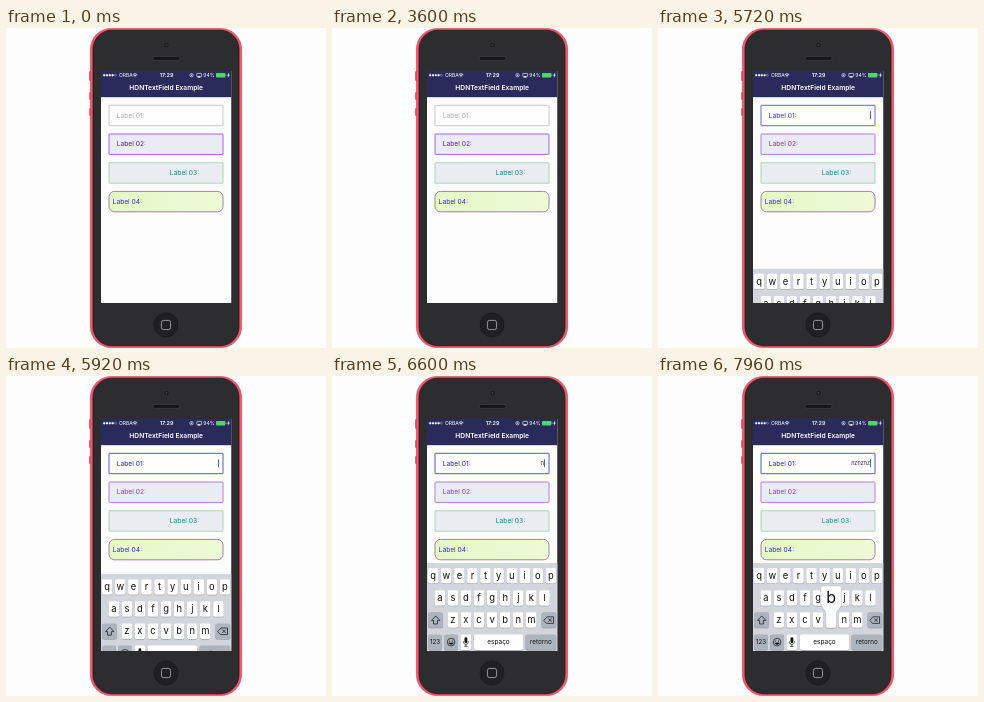
Recreate the animation shown at these times as an HTML page. Size 320 by 320 pixels, loop 8000 ms.

```html
<!DOCTYPE html>
<html lang="pt">
<head>
<meta charset="utf-8">
<title>HDNTextField Example</title>
<style>
html, body { margin: 0; width: 100%; height: 100%; overflow: hidden; background: #fdfdfd; }
svg { display: block; width: 100vw; height: 100vh; }
text { font-family: Inter, Roboto, sans-serif; }
</style>
</head>
<body>
<svg id="stage" viewBox="0 0 320 320"></svg>
<script>
const NS = "http://www.w3.org/2000/svg";
const stage = document.getElementById("stage");
const LOOP = 8000;

function add(parent, tag, attrs, content) {
  const el = document.createElementNS(NS, tag);
  for (const k in attrs) el.setAttribute(k, attrs[k]);
  if (content) el.textContent = content;
  parent.appendChild(el);
  return el;
}
const rect = (p, x, y, width, height, fill, rx = 0, more = {}) =>
  add(p, "rect", { x, y, width, height, fill, rx, ...more });
const dot = (p, cx, cy, r, fill, more = {}) => add(p, "circle", { cx, cy, r, fill, ...more });
const line = (p, d, stroke, width = 0.7, fill = "none") =>
  add(p, "path", { d, stroke, "stroke-width": width, fill, "stroke-linejoin": "round", "stroke-linecap": "round" });
const label = (p, x, y, size, fill, str, anchor = "start", weight = 400) =>
  add(p, "text", { x, y, "font-size": size, fill, "text-anchor": anchor, "font-weight": weight }, str);

const defs = add(stage, "defs", {});
const clip = add(defs, "clipPath", { id: "screen" });
rect(clip, 95, 43, 130.5, 232, "#000");
const grad = add(defs, "linearGradient", { id: "lime" });
add(grad, "stop", { offset: 0, "stop-color": "#e6f8c6" });
add(grad, "stop", { offset: 1, "stop-color": "#edfad6" });

// phone body
for (const [y, h] of [[43, 10], [64, 8], [80, 8]]) rect(stage, 83.2, y, 3, h, "#d9405a", 1);
rect(stage, 84.4, 0.4, 151.2, 319.2, "#f4566e", 21, { stroke: "#d8465e", "stroke-width": 0.7 });
rect(stage, 87, 2.2, 146, 315.6, "#2d2d2f", 19, { stroke: "#1c1c1e", "stroke-width": 0.8 });
dot(stage, 160.5, 17, 2.1, "#17171b");
dot(stage, 160.5, 17, 0.9, "#3b4258");
rect(stage, 147, 28.4, 27, 4, "#151517", 2, { stroke: "#48484b", "stroke-width": 0.6 });
dot(stage, 160, 297, 12, "#202022", { stroke: "#19191b", "stroke-width": 0.7 });
rect(stage, 155.4, 292.4, 9.2, 9.2, "none", 2.2, { stroke: "#a5a5a8", "stroke-width": 0.9 });

const screen = add(stage, "g", { "clip-path": "url(#screen)" });
rect(screen, 95, 43, 130.5, 232, "#fdfdfd");

// status and title bars
rect(screen, 95, 43, 130.5, 26.2, "#2a2b5b");
for (let i = 0; i < 5; i++)
  dot(screen, 98.2 + i * 2.8, 47.2, 1, i < 4 ? "#fff" : "none", { stroke: "#fff", "stroke-width": 0.3 });
label(screen, 113, 49.2, 5, "#fff", "ORBA");
line(screen, "M127 46.4Q129 44.6 131 46.4M127.9 47.5Q129 46.6 130.1 47.5M129 48.8v.1", "#fff", 0.8);
label(screen, 160.5, 49.3, 5.4, "#fff", "17:29", "middle", 600);
dot(screen, 185.5, 47.2, 1.7, "none", { stroke: "#fff", "stroke-width": 0.6 });
dot(screen, 185.5, 47.2, 0.6, "#fff");
rect(screen, 190.8, 45.4, 4.8, 3.2, "none", 0.4, { stroke: "#fff", "stroke-width": 0.6 });
line(screen, "M192 49.4h2.4l-1.2-1.3z", "#fff", 0.3, "#fff");
label(screen, 208.6, 49.2, 5, "#fff", "94%", "end");
rect(screen, 210, 45, 9.4, 4.4, "#4cd964", 0.8);
rect(screen, 219.7, 46.4, 0.7, 1.6, "#4cd964");
line(screen, "M222.8 45L221.4 47.4H222.6L222 49.6L223.6 46.8H222.4Z", "#fff", 0.2, "#fff");
label(screen, 160.2, 62.3, 6.7, "#fff", "HDNTextField Example", "middle", 600);

// text fields
function field(y, fill, stroke, rx, x, color, str) {
  return {
    box: rect(screen, 103, y, 114, 20.4, fill, rx, { stroke, "stroke-width": 0.9 }),
    tag: label(screen, x, y + 12.4, 6.7, color, str)
  };
}
const first = field(77.3, "#fefefe", "#c6c6c6", 0.3, 110.7, "#acacae", "Label 01:");
const second = field(106, "#e9ecf1", "#a052ea", 0.8, 110.7, "#5d17b5", "Label 02:");
field(134.8, "#e9edf1", "#a3d3ae", 0.3, 163.8, "#0c8b8b", "Label 03:");
field(163.4, "url(#lime)", "#9b729f", 5.5, 106.6, "#3a2bd0", "Label 04:");
const typed = label(screen, 212, 89.4, 5.5, "#2c2c40", "", "end");
const caret = rect(screen, 212.1, 83.2, 0.9, 8, "#3550d8", 0.3);

// keyboard
const GREY = "#adb4be", INK = "#101012";
const board = add(screen, "g", {});
rect(board, 95, 187, 130.5, 89, "#d2d5db");
function key(x, y, w, fill = "#fff") {
  rect(board, x, y + 0.5, w, 15.5, "#888b90", 1.7);
  rect(board, x, y, w, 15.5, fill, 1.7);
}
const keyX = {};
[["qwertyuiop", 101.2, 192], ["asdfghjkl", 107.8, 214.2], ["zxcvbnm", 120.8, 236.3]].forEach(([row, x0, y]) => {
  [...row].forEach((ch, i) => {
    const x = keyX[ch] = x0 + i * 13.08;
    key(x - 5.3, y, 10.6);
    label(board, x, y + 11, 9.4, INK, ch, "middle");
  });
});
key(96.2, 236.3, 14.6, GREY);
line(board, "M103.5 240.2L99.5 244.4H101.6V248H105.4V244.4H107.5Z", INK, 0.7);
key(209.6, 236.3, 14.6, GREY);
line(board, "M212 244.1L215 240.8H221.5V247.4H215ZM216.6 242.7L219.4 245.5M219.4 242.7L216.6 245.5", INK, 0.7);

const bottom = 258.4;
key(96.2, bottom, 13.6, GREY);
label(board, 103, 268.4, 6.2, INK, "123", "middle");
key(112.2, bottom, 13.8, GREY);
dot(board, 119.1, 266.1, 3.8, "none", { stroke: INK, "stroke-width": 0.7 });
dot(board, 117.7, 265, 0.55, INK);
dot(board, 120.5, 265, 0.55, INK);
line(board, "M116.8 267Q119.1 270.2 121.4 267Z", INK, 0.4, INK);
key(128.4, bottom, 11, "#fff");
rect(board, 132.5, 261.2, 2.8, 6, INK, 1.4);
line(board, "M131.3 265.5Q131.3 268.6 133.9 268.6T136.5 265.5M133.9 268.6V270.4M132.5 270.4H135.3", INK, 0.6);
key(141.8, bottom, 49.4);
label(board, 166.5, 268.3, 6.5, INK, "espaço", "middle");
key(193.6, bottom, 30.6, GREY);
label(board, 208.9, 268.3, 6.3, INK, "retorno", "middle");

// enlarged key
const popup = add(screen, "g", {});
const bubble = "M-8.2 210H8.2Q10.4 210 10.4 212.2V227C10.4 233 5.3 233 5.3 238.5V250Q5.3 251.9 3.4 251.9" +
  "H-3.4Q-5.3 251.9 -5.3 250V238.5C-5.3 233 -10.4 233 -10.4 227V212.2Q-10.4 210 -8.2 210Z";
add(popup, "path", { d: bubble, fill: "#8d9096", opacity: 0.55, transform: "translate(0 .7)" });
add(popup, "path", { d: bubble, fill: "#fcfcfd", stroke: "#b4b8bf", "stroke-width": 0.4 });
const big = label(popup, 0, 227, 16, INK, "", "middle");

// key, shown from, hidden at, letter inserted at
const presses = [
  ["n", 6320, 6440, 6400], ["z", 6680, 6800, 6760], ["n", 7040, 7160, 7120],
  ["z", 7280, 7400, 7360], ["n", 7520, 7640, 7600], ["z", 7840, 7960, 7880],
  ["b", 7960, 8080, 8040]
];

const FOCUS = 5460, FADE = 300, RISE = 5600;
const mix = (a, b, k) => "rgb(" + a.map((v, i) => Math.round(v + (b[i] - v) * k)) + ")";

function draw(t) {
  const k = Math.min(1, Math.max(0, (t - FOCUS) / FADE));
  first.box.setAttribute("stroke", mix([198, 198, 198], [70, 70, 205], k));
  first.tag.setAttribute("fill", mix([172, 172, 174], [38, 32, 180], k));
  second.box.setAttribute("stroke", mix([160, 82, 234], [176, 112, 226], k));
  second.tag.setAttribute("fill", mix([93, 23, 181], [136, 58, 190], k));
  caret.setAttribute("opacity", t >= FOCUS + 40 ? 1 : 0);

  // critically damped rise
  const s = Math.max(0, t - RISE) * 0.0112;
  board.setAttribute("transform", `translate(0 ${(88.5 * (1 + s) * Math.exp(-s)).toFixed(2)})`);

  typed.textContent = presses.filter(p => t >= p[3]).map(p => p[0]).join("");
  const down = presses.find(p => t >= p[1] && t < p[2]);
  popup.setAttribute("visibility", down ? "visible" : "hidden");
  if (down) {
    popup.setAttribute("transform", `translate(${keyX[down[0]]} 0)`);
    big.textContent = down[0];
  }
}

const start = performance.now();
function tick() {
  draw((performance.now() - start) % LOOP);
  requestAnimationFrame(tick);
}
tick();
</script>
</body>
</html>
```
